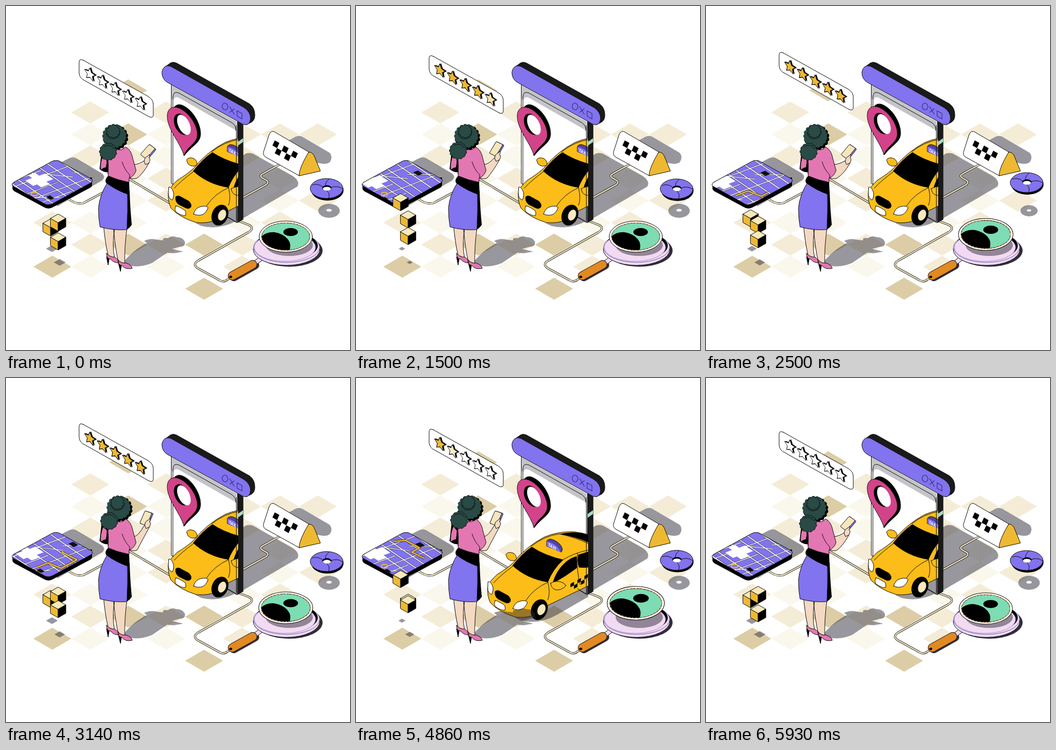
Write an HTML page that moves like this. It is 640 by 640 pixels and loops after 6 s.

```html
<!DOCTYPE html>
<html lang="en">
<head>
<meta charset="utf-8">
<title>Taxi order</title>
<style>
html, body { margin: 0; width: 100%; height: 100%; overflow: hidden; background: #fff; }
svg { display: block; width: 100vw; height: 100vh; }
.o { stroke: #111; stroke-width: 1; stroke-linejoin: round; stroke-linecap: round; }
.line { fill: none; stroke: #111; stroke-width: 1; stroke-linecap: round; stroke-linejoin: round; }
.shade { fill: #2d2b38; opacity: .49; }
.violet { fill: #8273ee; } .yellow { fill: #fdbd18; } .gold { fill: #eeb932; }
.pink { fill: #e377b3; } .skin { fill: #f4d9c2; } .white { fill: #fff; } .hair { fill: #294a45; }
.tube { fill: none; stroke: #111; stroke-width: 3.8; stroke-linecap: round; }
.tube.core { stroke: #f6e8bf; stroke-width: 2.2; }
text { font: 700 8px Inter, Arial, sans-serif; fill: #fff; }
</style>
</head>
<body>
<svg viewBox="0 0 640 640" xmlns="http://www.w3.org/2000/svg">
<defs>
  <clipPath id="mapClip"><rect width="100" height="100" rx="9" transform="matrix(.86 -.47 .72 .4 7 332)"/></clipPath>
  <clipPath id="carClip"><path d="M0 0H432V640H0Z"/></clipPath>
  <clipPath id="lensClip"><ellipse rx="45" ry="25.5"/></clipPath>
</defs>

<g id="tiles"></g>

<g class="shade">
  <path d="M92 296L118 283Q124 280 130 283L178 311Q187 318 178 325L95 373Z"/>
  <path d="M441 278Q449 271 460 275L533 316Q548 326 542 336L441 395Z"/>
  <path d="M526 250L539 243Q545 240 551 243L602 273Q609 281 602 291Q596 295 586 293L540 285Z"/>
  <path id="cubeShade1"/><path id="cubeShade2"/>
  <path id="ringShade" fill-rule="evenodd" d="M-20 0A20 13 0 0 1 20 0A20 13 0 0 1-20 0ZM-5-1A5 2.5 0 0 0 5-1A5 2.5 0 0 0-5-1Z"/>
</g>

<g id="cables"></g>

<!-- map -->
<path d="M12 330V340Q13 344 20 347L70 374Q78 379 86 375L155 339Q161 336 160 331V319Z"/>
<g clip-path="url(#mapClip)">
  <path class="violet" d="M0 270H170V380H0Z"/>
  <g id="streets"></g>
  <ellipse id="ring" class="line" cx="53" cy="350" rx="6" ry="3.2" style="stroke:#eeb932;stroke-width:2"/>
  <g fill="none" stroke-linejoin="round">
    <path class="route" stroke="#111" stroke-width="4"/>
    <path class="route" stroke="#eeb932" stroke-width="2.6"/>
  </g>
</g>
<rect class="line" width="100" height="100" rx="9" transform="matrix(.86 -.47 .72 .4 7 332)" vector-effect="non-scaling-stroke"/>

<g id="cubes"></g>

<!-- portal -->
<path class="white" d="M307 146V330L430 403V216Z"/>
<path d="M308 147L429 215V232L322 171Q313 167 311 176L308 172Z" fill="#c4c3c7"/>
<path class="line" d="M307.5 146V330L429 403M310.5 332V170Q311 157 322 162L420 217Q428 222 428 232"/>
<path d="M431 215L441 221V397L430.5 403Z" fill="#1a1a1a" class="o"/>
<path d="M431 253L441 246V253L431 260Z" fill="#a9d8c8"/>

<!-- car -->
<g clip-path="url(#carClip)"><g id="car">
  <path class="shade" d="M296 446L306 451Q340 460 375 440L520 356V340L360 390Z"/>
  <path class="yellow o" d="M245 391Q246 380 262 366Q280 355 291 345Q316 314 350 296Q375 285 405 286Q440 289 475 315L500 350L475 366L357 423L335 440Q318 447 297 445Q265 435 250 418Q244 406 245 391Z"/>
  <path d="M379 290Q405 284 431 291Q460 298 475 315L432 306Q410 296 379 290Z"/>
  <path class="line" d="M326 313Q350 294 378 290Q410 297 432 308M385 338Q405 326 432 320M357 380Q362 400 357 413M412 326Q410 360 417 384M292 350Q270 366 256 381M357 380Q330 392 316 414"/>
  <path d="M291 349Q308 327 327 314Q351 330 386 338Q367 355 357 380Q318 374 291 349Z"/>
  <path class="o" d="M366 382Q373 357 391 342Q401 334 410 332L411 353Q390 369 366 382ZM414 329L450 318V345Q435 355 415 352Q411 340 414 329Z"/>
  <g id="checks"></g>
  <path class="yellow o" d="M279 328Q283 322 293 326Q300 331 298 338Q289 343 282 336ZM362 382Q373 375 385 381L391 386Q382 396 371 394Q363 391 362 382Z"/>
  <path class="white o" d="M246 379Q251 377 255 390Q255 400 252 403Q245 400 245 391ZM292 429Q295 417 306 415Q316 413 319 417Q316 426 309 430Q300 433 292 429Z"/>
  <path class="o" d="M259 397Q263 393 270 398L283 405Q289 411 287 416Q283 421 276 417L264 411Q257 405 259 397Z"/>
  <path class="white o" d="M259 414Q263 414 274 421Q279 424 277 432Q270 433 259 425Q256 420 259 414Z"/>
  <ellipse cx="341" cy="431" rx="15" ry="20" transform="rotate(23 341 431)"/>
  <ellipse class="o" cx="345" cy="431" rx="7.5" ry="11" transform="rotate(23 345 431)" fill="#f8e9c0"/>
  <path d="M355 303Q359 297 369 302Q382 308 384 319L382 324L355 313Z" fill="#4e43a8" class="o"/>
  <path class="violet" d="M355 304Q372 307 381 324L355 313Z"/>
  <text transform="matrix(.78 .43 -.2 .95 357 312.5)">TAXI</text>
</g></g>
<path class="line" d="M428.5 222V402M412 392L429 402"/>

<!-- title bar -->
<path d="M295 114L306 106Q311 103 317 106L453 182Q463 189 463 203Q463 212 457 216L447 221Z" fill="#1a1a1a" class="o"/>
<path class="violet o" d="M306 112L443 189Q455 197 455 210Q453 224 441 220L300 142Q290 136 290 123Q293 108 306 112Z"/>
<g fill="none" stroke="#332b80" stroke-width="1.1">
  <ellipse cx="407.5" cy="187" rx="5.2" ry="6.3" transform="rotate(-15 407.5 187)"/>
  <path d="M416 187L425 202M425 191L416 198M430 195L439 200V210L430 205Z"/>
</g>

<!-- pin -->
<g id="pin">
  <path d="M313 188Q318 182 326 184C347 191 363 220 362 239C361 256 345 260 332 278Z" class="o"/>
  <path fill="#d3438a" class="o" d="M331 278C325 255 300 230 300 205C300 189 312 184 326 192C342 201 356 222 356 239C356 256 338 260 331 278Z"/>
  <ellipse cx="327" cy="220" rx="13" ry="21" transform="rotate(-25 327 220)"/>
  <ellipse class="white" cx="331" cy="221" rx="10.5" ry="20" transform="rotate(-25 331 221)"/>
</g>

<!-- roof sign -->
<path class="white o" d="M490 238Q494 230 501 235L564 272L546 316L483 281Q478 278 479 272Z"/>
<path class="gold o" d="M563 272Q569 271 573 278L585 307L545 316Q546 300 563 272Z"/>
<g id="signChecks"></g>

<!-- floating ring -->
<g id="donut">
  <ellipse cx="1" cy="2" rx="30" ry="19"/>
  <ellipse class="violet o" cx="-.5" cy="-1.5" rx="30.5" ry="18.5"/>
  <path class="line" d="M-7-4Q-17-12-27-8M7-3Q20-8 29-1M0 3Q7 8 3 17M-2-5Q-5-12 4-19"/>
  <ellipse cy="-2.5" rx="8.5" ry="5"/><ellipse class="white" cy="-1" rx="7.5" ry="3.5"/>
</g>

<!-- magnifier -->
<g fill="#302e3a">
  <ellipse cx="527" cy="455" rx="62" ry="30"/>
  <path d="M424 504L463 482" stroke="#302e3a" stroke-width="16" stroke-linecap="round"/>
</g>
<path class="o" fill="#f2dbf2" d="M461 475L474 465L482 469L466 481Z"/>
<path d="M421 502L459 481" stroke="#111" stroke-width="16.5" stroke-linecap="round"/>
<path d="M421 502L459 481" stroke="#e28922" stroke-width="14.7" stroke-linecap="round"/>
<ellipse cx="418" cy="504" rx="2.8" ry="2.2"/>
<ellipse class="o" cx="522" cy="453" rx="62" ry="29.5" fill="#f2dbf2"/>
<ellipse cx="522" cy="449" rx="61.5" ry="28" fill="#f2dbf2" stroke="#6e63b5"/>
<ellipse cx="522" cy="446" rx="58" ry="26"/>
<ellipse cx="519" cy="449" rx="57" ry="26" fill="#f2dbf2" stroke="#8f86c9" stroke-width=".8"/>
<ellipse class="shade" cx="527" cy="445" rx="44" ry="20"/>
<g id="lens">
  <ellipse class="white o" rx="49.5" ry="29"/>
  <ellipse rx="45" ry="25.5" fill="#7ddcb3"/>
  <g clip-path="url(#lensClip)"><path d="M-48 2Q-36-10-20-8Q0-4 7 10Q10 18 6 29H-48Z"/><ellipse cx="9" cy="-8.5" rx="13.5" ry="7.5"/></g>
  <ellipse class="line" rx="45" ry="25.5"/>
  <ellipse class="line" rx="45" ry="25.5" style="stroke:#e9a13b;stroke-dasharray:3 3"/>
</g>

<!-- rating -->
<g id="rating">
  <path class="white o" d="M144 101L264 168Q274 174 274 183V200Q275 210 266 206L147 139Q137 135 136 125V108Q135 96 144 101Z"/>
  <g id="stars"></g>
</g>

<!-- customer -->
<path class="shade" d="M214 482Q234 455 262 441L257 437Q269 431 282 435L292 436Q291 430 301 432Q309 426 317 430Q329 430 333 439Q334 448 323 448L309 452L330 457L312 460L300 459Q288 467 272 478Q254 486 235 484Z"/>
<path class="skin o" d="M181 402Q184 440 190 464L202 469Q197 445 202 414ZM200 414Q203 450 209 476L221 479Q220 452 225 413Z"/>
<path class="o" d="M187 467L190 482L192 470ZM209 478L213 494L215 481Z"/>
<path class="pink o" d="M187 460Q194 468 202 467Q211 472 210 478Q200 478 195 471Q187 471 187 460ZM208 472Q216 480 223 478Q233 481 235 488Q222 491 216 483Q207 481 208 472Z"/>
<path d="M224 338L230 344Q231 378 234 407Q231 412 225 416Z"/>
<path class="violet o" d="M189 328Q174 352 172 376Q172 395 175 411Q200 418 225 416Q227 380 226 346Z"/>
<path d="M190 316Q183 323 186 329Q204 343 230 352L229 327Z"/>
<path class="skin o" id="forearm"/>
<path d="M178 270L174 303Q181 310 189 309L194 280Z"/>
<path class="pink o" d="M181 276Q175 290 176 305Q181 301 187 300L188 284Z"/>
<path class="skin o" d="M206 254L205 270L219 269L217 256Z"/>
<path class="pink o" d="M205 266Q216 271 222 262Q233 267 236 284L242 306Q238 317 229 320V328Q208 324 190 316Q191 292 189 278Z"/>
<path d="M189 285L186 299L190 314Z"/>
<path class="line" d="M216 290Q220 304 230 314V320"/>
<g id="phone">
  <path class="violet o" d="M-6-14H8Q10-14 10-12V12L7 14Z"/>
  <rect class="o" x="-8" y="-14" width="15" height="28" rx="2" fill="#f6e6bb"/>
</g>
<path id="hand" class="skin o" d="M-5 4Q-5-3 2-6L5-9Q6-5 4-2Q8-1 4 7L-2 10Z"/>
<g id="head"></g>
<g id="bun"></g>
</svg>
<script>
const $ = id => document.getElementById(id);
const LOOP = 6000;
const KEYS = [0, 1500, 2500, 3140, 3930, 4860, 6000];
const clamp = x => Math.min(1, Math.max(0, x));
const ramp = (t, from, to) => clamp((t - from) / (to - from));
const smooth = u => u * u * (3 - 2 * u);
const move = (id, x, y, extra = '') => $(id).setAttribute('transform', `translate(${x} ${y}) ${extra}`);

// Periodic Hermite curve that rests at its extremes.
function track(t, values) {
  const n = values.length;
  const at = i => values[(i + n) % n];
  const gap = i => KEYS[(i + n) % n + 1] - KEYS[(i + n) % n];
  const slope = i => (at(i + 1) - at(i)) / gap(i);
  const tangent = i => slope(i - 1) * slope(i) <= 0 ? 0 : 2 / (1 / slope(i - 1) + 1 / slope(i));
  let i = 0;
  while (i < n - 1 && t >= KEYS[i + 1]) i++;
  const h = gap(i), u = (t - KEYS[i]) / h, s = smooth(u);
  return at(i) * (1 - s) + at(i + 1) * s +
    h * u * (1 - u) * ((1 - u) * tangent(i) - u * tangent(i + 1));
}

const diamond = (x, y, w, h) => `M${x - w} ${y}L${x} ${y - h}L${x + w} ${y}L${x} ${y + h}Z`;

function drawTiles() {
  const colors = { l: '#f4ecd6', v: '#faf7ec', d: '#dccda6' };
  const rows = ['..d', '.l.l', '.vdv.lll', '.llv.l', '.vvl..v', '..vl..vl', 'lvv..vl', '.ldldll', 'dv.v.l', '....d'];
  $('tiles').innerHTML = rows.map((row, j) => [...row].map((c, i) => colors[c]
    ? `<path d="${diamond(86.2 + 70.6 * i, 157 + 41 * j, 35.3, 20.5)}" fill="${colors[c]}"/>` : '').join('')).join('');
}

function drawCables() {
  const paths = [
    'M116 359Q135 373 149 364L190 342M224 319L312 371',
    'M436 359L483 333Q491 328 484 324L477 320Q470 316 478 312L512 293',
    'M412 392L451 407Q464 413 451 421L357 474Q346 481 357 488L397 510Q405 515 412 509L421 503'
  ];
  $('cables').innerHTML = paths.map(d => `<path class="tube" d="${d}"/><path class="tube core" d="${d}"/>`).join('');
}

// Streets run slightly askew to the edges of the map.
function drawStreets() {
  const lines = [-45, -24, -2, 14, 46, 66, 84, 106, 128].map((p, i) =>
    `M${p} -80V170M-70 ${p + 5}H${i % 2 ? 170 : 62}`).join('');
  const extra = 'M-10 60L36 94M60 15L92 52M100 40L140 70';
  $('streets').innerHTML = `<g transform="matrix(.9 -.34 .66 .45 7 326)" fill="none">
    <path d="${lines}${extra}" stroke="#222" stroke-width="3.6"/>
    <path d="${lines}${extra}" stroke="#fff" stroke-width="2.2"/>
    <path fill="#fff" d="M22 14H36V4H50V15H62V38H48V48H30V36H22Z"/>
    <path fill="#111" d="M18 78H26V90H18ZM112 40H122V54H112Z"/></g>`;
}

function drawChecks() {
  const cell = (x, y, a, b) => `M${x} ${y}l${a[0]} ${a[1]}l${b[0]} ${b[1]}l${-a[0]} ${-a[1]}Z`;
  const grid = (x, y, a, b, count) => Array.from({ length: count }, (_, k) => {
    const r = k % 2;
    return cell(x + a[0] * k + b[0] * r, y + a[1] * k + b[1] * r, a, b);
  }).join('');
  $('signChecks').innerHTML = `<path d="${grid(500, 250, [8.6, 4.8], [-4.3, 9.6], 5)}"/>`;
  $('checks').innerHTML = `<path d="${grid(399, 383, [6.5, -3.7], [0, 6.5], 9)}"/>`;
}

function drawStars() {
  const points = Array.from({ length: 10 }, (_, k) => {
    const a = -Math.PI / 2 + k * Math.PI / 5, r = k % 2 ? 5.6 : 12;
    return `${(r * Math.cos(a)).toFixed(2)},${(r * Math.sin(a)).toFixed(2)}`;
  }).join(' ');
  const star = cls => `<polygon class="${cls}" points="${points}"/>`;
  $('stars').innerHTML = Array.from({ length: 5 }, (_, i) =>
    `<g transform="matrix(.87 .48 0 1 ${156 + 23.5 * i} ${127 + 13.4 * i})">
      <g transform="translate(2.6 -1.6)">${star('o')}</g>${star('white o')}${star('gold o fill')}</g>`).join('');
}

function drawCubes() {
  const cube = `<path class="o gold" d="M-14-8L0 0V16L-14 8Z"/><path class="o" d="M14-8L0 0V16L14 8Z"/>
    <path class="o" fill="#f8e9b8" d="${diamond(0, -8, 14, 8)}"/>`;
  $('cubes').innerHTML = [0, 1, 2].map(i => `<g id="cube${i}">${cube}</g>`).join('');
}

function scallop(r, n) {
  const step = 2 * Math.PI / n, bump = r * Math.sin(step / 2) * 1.1;
  const point = k => `${(r * Math.cos(k * step)).toFixed(2)} ${(r * Math.sin(k * step)).toFixed(2)}`;
  return `M${point(0)}` + Array.from({ length: n }, (_, k) => `A${bump} ${bump} 0 0 1 ${point(k + 1)}`).join('') + 'Z';
}

function drawHair() {
  $('head').innerHTML = `<path d="${scallop(21.5, 17)}" transform="translate(1.5 1.5)"/>
    <path class="hair" d="${scallop(20.5, 17)}" transform="translate(-1 -1)"/>
    <path class="hair o" d="${scallop(11, 10)}" transform="translate(-3 -10)"/>
    <path class="line" d="M-16-6Q-13 5-3 4Q8 4 10-9"/>`;
  $('bun').innerHTML = `<path class="hair o" d="${scallop(14.5, 13)}"/><path class="line" d="M-8-10Q4-16 11-5"/>`;
}

const ROUTE = 'M55 353L78 344L103 354L132 338L104 324L118 316L92 302L70 304';
const routes = document.querySelectorAll('.route');
for (const r of routes) {
  r.setAttribute('d', ROUTE);
  r.setAttribute('pathLength', 100);
}

drawTiles(); drawCables(); drawStreets(); drawChecks(); drawStars(); drawCubes(); drawHair();
const fills = document.querySelectorAll('.fill');

function donutLift(t) {
  const p = t % 2000 / 2000;
  if (p < .25) return -11 * smooth(p / .25);
  if (p < .5) return -11 + 13 * smooth((p - .25) / .25);
  return 2 - 2 * smooth(ramp(p, .5, .93));
}

function render(t) {
  move('rating', 0, -7.3 * (1 - Math.cos(2 * Math.PI * t / LOOP)));
  fills.forEach((el, i) => {
    el.style.opacity = ramp(t, 400 + 250 * i, 650 + 250 * i) * (1 - ramp(t, 4930 - 250 * i, 5180 - 250 * i));
  });

  const out = smooth(ramp(t, 3200, 4220)) * (1 - smooth(ramp(t, 5000, 5920)));
  move('car', 57 * (1 - out), -42 * (1 - out));
  move('pin', 0, -2.7 * smooth(ramp(t, 2000, 3000)) * (1 - smooth(ramp(t, 3150, 3800))));

  const lift = donutLift(t), small = 1 + Math.min(0, lift) / 55;
  move('donut', 597, 341 + lift);
  move('ringShade', 601, 381, `scale(${small})`);
  move('lens', 520.5, 429 + track(t, [0, 0, -4, -1.5, -7.5, -10]),
    `scale(${track(t, [1, 1, 1.025, 1.015, 1.05, 1.075])})`);

  move('cube0', 83, track(t, [412, 365, 395, 411, 391, 374]));
  move('cube1', 97, track(t, [403, 397, 407, 405, 394, 418]));
  move('cube2', 97, track(t, [438, 428, 434, 430, 423, 421]));
  const w1 = track(t, [11, 6, 9, 11, 9.5, 6.5]), w2 = track(t, [11, 5.5, 10, 10, 5.5, 8.5]);
  $('cubeShade1').setAttribute('d', diamond(85.5, 451.5, w1, w1 * .57));
  $('cubeShade2').setAttribute('d', diamond(100, 477, w2, w2 * .57));

  const scroll = track(t, [0, -28, -33, -18, -7, -24]) * smooth(ramp(t, 700, 1400));
  move('streets', scroll, -.12 * scroll);
  const head = 100 * ramp(t, 1700, 3930), tail = 100 * ramp(t, 4150, 5600);
  for (const r of routes) {
    r.style.visibility = head > tail ? 'visible' : 'hidden';
    r.setAttribute('stroke-dasharray', `0 ${tail} ${Math.max(0, head - tail)} 200`);
  }
  $('ring').style.opacity = t < 1700 || t > 4700 ? 1 : 0;

  const hx = track(t, [262, 263, 264, 263, 260, 263]);
  const hy = track(t, [285, 279, 285, 270, 269, 270]);
  $('forearm').setAttribute('d',
    `M238 295Q246 295 ${hx - 5} ${hy + 3}L${hx + 4} ${hy + 7}Q${hx - 7} ${hy + 27} 244 320Q238 323 231 320Z`);
  move('hand', hx, hy);
  move('phone', track(t, [264, 261, 265, 260.5, 257, 260.5]), track(t, [271, 266, 271, 261, 259, 261]),
    `rotate(${track(t, [36, 26, 34, 18, 12, 18])}) skewX(-5) scale(.9)`);
  move('head', track(t, [202.5, 206, 204.5, 210.5, 210, 212]), 243 + track(t, [0, 0, 0, -1, -1, -1.5]));
  move('bun', track(t, [190, 190, 191, 192, 190, 192]), track(t, [271, 269, 271, 266, 264.5, 264.5]));
}

const start = performance.now();
function frame() {
  render((performance.now() - start) % LOOP);
  requestAnimationFrame(frame);
}
frame();
</script>
</body>
</html>
```
